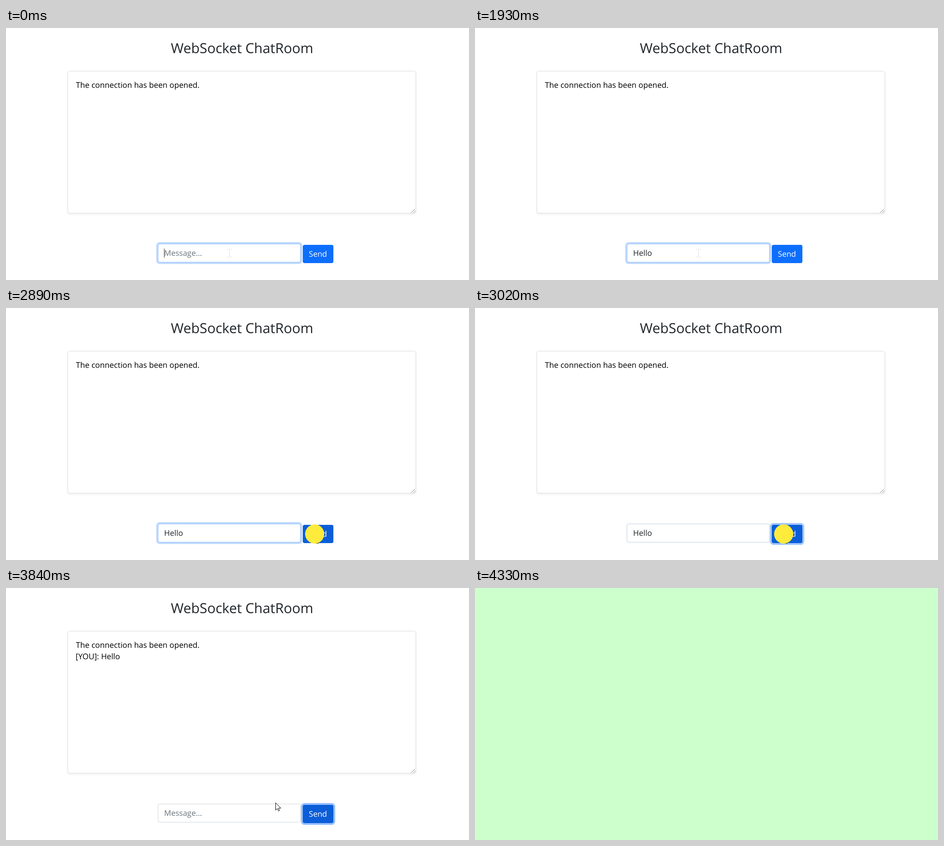
Animation of 1014 by 552 pixels, one loop 5.04 s. Source, as an HTML page:

```html
<!DOCTYPE html>
<html lang="en">
<head>
<meta charset="utf-8">
<title>WebSocket ChatRoom</title>
<style>
  html, body { margin: 0; width: 100%; height: 100%; overflow: hidden; background: #fff; }
  svg { display: block; width: 1014px; height: 552px; }
  text { font: 17.2px "Open Sans", "Noto Sans", sans-serif; white-space: pre; text-rendering: geometricPrecision; }
  .title { font-size: 30.3px; fill: #212529; }
  .small { font-size: 17px; }
  #log { fill: #fff; stroke: #dadee2; filter: drop-shadow(0 2px 2px rgba(0, 0, 0, .075)); }
  #pointers path { stroke: #000; fill: #fff; stroke-linejoin: round; }
  #pointers #ibeam { stroke: #dedede; fill: none; }
</style>
</head>
<body>
<svg viewBox="0 0 1014 552">
  <text class="title" x="361" y="55">WebSocket ChatRoom</text>

  <rect id="log" x="135.5" y="94.5" width="762" height="311" rx="4"/>
  <path d="M887.5 404.5l8-8M892.5 404.5l4-4" stroke="#777" fill="none"/>
  <text x="153" y="131">The connection has been opened.</text>
  <text id="reply" x="152.6" y="156">[YOU]: Hello</text>

  <rect id="inputRing" x="329" y="469" width="320" height="48" rx="7.5" fill="#c2dbfe"/>
  <rect id="input" x="333" y="473" width="312" height="40" rx="3.5" fill="#fff"/>
  <text id="hint" class="small" x="346.3" y="499.3" fill="#6c757d">Message...</text>
  <text id="typed" x="346.3" y="499.3" fill="#212529"></text>
  <rect id="caret" y="483" width="1" height="20" fill="#333"/>

  <rect id="buttonRing" x="646" y="471" width="75" height="48" rx="7.5" fill="#98c1fe"/>
  <rect id="button" x="650" y="475" width="67" height="40" rx="4"/>
  <text class="small" x="663.3" y="500.5" fill="#fff">Send</text>

  <g id="pointers">
    <path id="ibeam" d="M-5 -8.5h4l1 1l1 -1h4M0 -7.5v15M-5 8.5h4l1 -1l1 1h4"/>
    <path id="arrow" d="M.5 .5V16.7l3.7-3.5 2.5 5.3 2.3-1.1-2.4-5.2h5.2z"/>
    <path id="hand" d="M-2 12V1.8a1.7 1.7 0 0 1 3.4 0V8c.6-1 2.8-.9 3 .6.6-.8 2.6-.6 2.8.8.8-.6 2 0 2 1.4V15c0 2-1.4 3.5-1.4 5.5H-.5c0-2-2.5-4-4-6.5-1.2-1.8-3-3.5-2-4.4 1.2-1 3 .6 4.5 2.4z"/>
  </g>
  <circle id="press" cx="676" cy="495" r="21" fill="#ffeb3b"/>
  <rect id="cover" width="1014" height="552" fill="#ccffcc"/>
</svg>
<script>
const LOOP = 5040;
const PRESS = 2890, SENT = 3030, END = 4330;
const KEYS = [[610, 'H'], [960, 'He'], [1140, 'Hel'], [1310, 'Hell'], [1440, 'Hello'], [SENT, '']];
const CARET = [[0, 40], [480, 1930], [2430, PRESS]];

const $ = id => document.getElementById(id);
const show = (id, on) => $(id).setAttribute('visibility', on ? 'visible' : 'hidden');
const within = (v, a, b) => v >= a && v < b;

const ramp = (t, start, length) => {
  const p = Math.min(1, Math.max(0, (t - start) / length));
  return p * p * (3 - 2 * p);
};
const mix = (a, b, p) => `rgb(${a.map((v, i) => Math.round(v + (b[i] - v) * p))})`;
const curve = (a, b, c, p) =>
  a.map((v, i) => (1 - p) ** 2 * v + 2 * p * (1 - p) * b[i] + p * p * c[i]);

function pointerAt(t) {
  const rest = [490, 493], target = [676, 495], above = [545, 457], last = [540, 454];
  if (t < 2400) return rest;
  if (t < PRESS) return curve(rest, [610, 583], target, (Math.floor((t - 2400) / 49) + 1) / 11);
  if (t < 3520) return target;
  if (t < 4050) {
    const p = Math.min(1, Math.floor((t - 3520) / 44.5) / 11);
    return curve(target, [625, 480], above, p * p * (3 - 2 * p));
  }
  return curve(above, [542, 455], last, Math.min(1, (Math.floor((t - 4050) / 57) + 1) / 5));
}

function pointerKind([x, y]) {
  if (within(x, 333, 645) && within(y, 473, 513)) return 'ibeam';
  if (within(x, 650, 717) && within(y, 475, 515)) return 'hand';
  return 'arrow';
}

function draw(t) {
  let word = '';
  for (const [at, value] of KEYS) if (t >= at) word = value;
  if ($('typed').textContent !== word) $('typed').textContent = word;
  show('hint', !word);

  const end = word ? $('typed').getComputedTextLength() : 0;
  $('caret').setAttribute('x', Math.round(346.3 + end));
  show('caret', CARET.some(([a, b]) => within(t, a, b)));

  const moved = ramp(t, PRESS + 10, 150);
  $('inputRing').setAttribute('opacity', 1 - moved);
  $('buttonRing').setAttribute('opacity', moved);
  $('input').setAttribute('stroke', mix([134, 183, 254], [206, 212, 218], moved));
  $('button').setAttribute('fill', mix([13, 110, 253], [11, 94, 215], ramp(t, 2770, 120)));

  const spot = pointerAt(t), kind = pointerKind(spot);
  for (const id of ['ibeam', 'arrow', 'hand']) show(id, id === kind);
  const [x, y] = spot.map(Math.round);
  const half = kind === 'ibeam' ? -.5 : 0;
  $('pointers').setAttribute('transform', `translate(${x + half} ${y})`);

  show('press', within(t, PRESS, SENT));
  show('reply', t >= SENT);
  show('cover', t >= END);
}

const begin = performance.now();
function tick() {
  draw((performance.now() - begin) % LOOP);
  requestAnimationFrame(tick);
}
tick();
</script>
</body>
</html>
```
